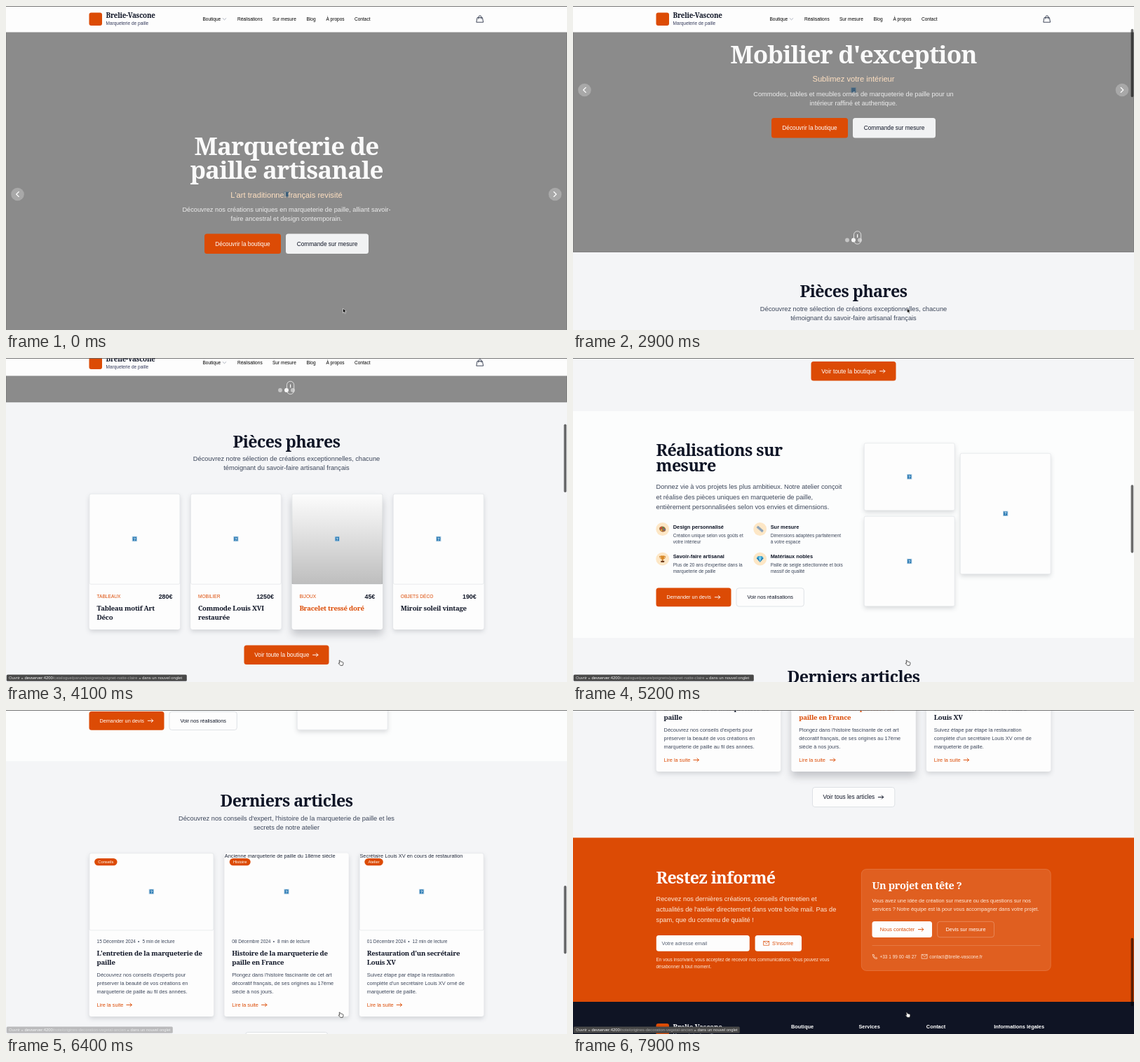
Recreate the animation shown at these times as an HTML page. Size 800x463 px, loop 8 s.

```html
<!DOCTYPE html>
<html lang="fr">
<head>
<meta charset="utf-8">
<title>Marqueterie de paille</title>
<style>
html, body { margin: 0; width: 100%; height: 100%; overflow: hidden; background: #f4f5f7; }
svg { display: block; width: 800px; height: 463px; }
text { font-family: "Liberation Sans", Arial, sans-serif; white-space: pre; }
.serif { font-family: "Noto Serif", Georgia, serif; font-weight: 700; letter-spacing: -.025em; }
.bold { font-weight: 700; }
.mid { text-anchor: middle; }
.end { text-anchor: end; }
.shadow { filter: drop-shadow(0 3px 3px rgba(20, 25, 40, .15)); }
</style>
</head>
<body>
<svg id="stage" viewBox="0 0 800 463" xmlns="http://www.w3.org/2000/svg"></svg>
<script>
const ORANGE = '#dc4b05', INK = '#0f1526', BODY = '#3c465a', WHITE = '#fdfdfd', GREY = '#f4f5f7';
const BRAND = 'Brelie-Vascone';

const text = (x, y, size, fill, str, cls = '', extra = '') =>
  `<text x="${x}" y="${y}" font-size="${size}" fill="${fill}" class="${cls}" ${extra}>${str}</text>`;
const lines = (x, y, step, size, fill, rows, cls, extra) =>
  rows.map((row, i) => text(x, y + i * step, size, fill, row, cls, extra)).join('');
const rect = (x, y, w, h, fill, r = 0, extra = '') =>
  `<rect x="${x}" y="${y}" width="${w}" height="${h}" rx="${r}" fill="${fill}" ${extra}/>`;
const path = (d, color, width = .9, extra = '') =>
  `<path d="${d}" fill="none" stroke="${color}" stroke-width="${width}" stroke-linecap="round" stroke-linejoin="round" ${extra}/>`;
const circle = (x, y, r, fill, extra = '') => `<circle cx="${x}" cy="${y}" r="${r}" fill="${fill}" ${extra}/>`;
const arrow = (x, y, color, extra) => path(`M${x} ${y}h7.4m-2.4-2.4l2.4 2.4l-2.4 2.4`, color, .95, extra);
const envelope = (x, y, color) =>
  path(`M${x} ${y - 2.8}h7.6v5.8h-7.6zl3.8 3.2l3.8-3.2`, color, .7);
const border = (color, width = .7) => `stroke="${color}" stroke-width="${width}"`;
const missing = (x, y, id = '') => `<g ${id}>` +
  rect(x - 3.7, y - 3.7, 7.4, 7.4, '#b9d3e6') + rect(x - 2.7, y - 2.9, 5.4, 5.8, '#2f7db5') +
  text(x, y + 2, 5.5, '#e4f1fa', '?', 'mid bold') + '</g>';
const frame = (x, y, w, h) => rect(x, y, w, h, WHITE, 3, 'class="shadow"') +
  rect(x + .3, y + .3, w - .6, h - .6, 'none', 2, border('#dcdfe3', .6));

function slide(id, title, titleY, sub, desc) {
  const y = titleY + (title.length - 1) * 34;
  const top = y + 78.5;
  return `<g id="${id}">` +
    lines(400, titleY, 34, 35, '#fafafa', title, 'serif mid') +
    text(400, y + 26.5, 11.15, '#fedfc0', sub, 'mid') +
    lines(400, y + 47, 13, 9.23, '#ececec', desc, 'mid') +
    rect(283, top, 109, 28.5, ORANGE, 3.5) + text(337.5, top + 17.3, 8.3, '#fff', 'Découvrir la boutique', 'mid') +
    rect(399, top, 118, 28.5, '#f1f2f3', 3.5) + text(458, top + 17.3, 8.3, INK, 'Commande sur mesure', 'mid') +
    '</g>';
}

function hero() {
  const nav = (x, dx) => circle(x, 269, 9.3, '#fff', 'fill-opacity=".25"') +
    path(`M${x - dx} 265.5l${2 * dx} 3.5l${-2 * dx} 3.5`, '#fff', 1.1);
  return rect(0, 37, 800, 464, '#8b8b8b') + rect(.5, 37.5, 799, 463, 'none', 0, border('#7c7c7c')) +
    `<g opacity=".65">${rect(396.3, 265.3, 7.4, 7.4, '#53748c')}${rect(397.3, 266.1, 5.4, 5.8, '#174a73')}</g>` +
    slide('slideA', ['Marqueterie de', 'paille artisanale'], 213, "L'art traditionnel français revisité",
      ['Découvrez nos créations uniques en marqueterie de paille, alliant savoir-', 'faire ancestral et design contemporain.']) +
    slide('slideB', ["Mobilier d'exception"], 230.5, 'Sublimez votre intérieur',
      ['Commodes, tables et meubles ornés de marqueterie de paille pour un', 'intérieur raffiné et authentique.']) +
    nav(16.5, -1.8) + nav(783, 1.8) +
    [391, 400, 409].map((x, i) => circle(x, 483.5, 2.9, '#fff', `opacity="${i === 1 ? 1 : .5}"`)).join('') +
    rect(400.5, 470.8, 10.2, 18.4, 'none', 5.1, border('#e8e8e8', .9)) + path('M405.6 475.5v4', '#fff', 1.2);
}

function products() {
  const items = [['TABLEAUX', '280€', ['Tableau motif Art', 'Déco']], ['MOBILIER', '1250€', ['Commode Louis XVI', 'restaurée']],
    ['BIJOUX', '45€', ['Bracelet tressé doré']], ['OBJETS DÉCO', '190€', ['Miroir soleil vintage']]];
  return rect(0, 501, 800, 418, GREY) +
    text(400, 565, 23.3, INK, 'Pièces phares', 'serif mid') +
    lines(400, 584.5, 13, 9.25, BODY, ['Découvrez notre sélection de créations exceptionnelles, chacune',
      'témoignant du savoir-faire artisanal français'], 'mid') +
    items.map(([kind, price, title], i) => {
      const x = 118.7 + i * 144.45, hot = i === 2;
      return rect(x, 631.5, 129.5, 194, WHITE, 3.5, `class="shadow" ${hot ? 'id="product"' : ''}`) +
        rect(x + .3, 631.8, 128.9, 128.9, 'none', 2, border('#dcdfe3', .6)) +
        (hot ? rect(x, 631.5, 129.5, 129, 'url(#shade)', 0, 'id="productShade"') : '') +
        missing(x + 64.7, 696) +
        text(x + 10.8, 780.5, 6.6, ORANGE, kind) + text(x + 118.7, 781.4, 8.9, INK, price, 'bold end') +
        lines(x + 10.8, 798.3, 13, 9.6, INK, title, 'serif', hot ? 'id="productTitle"' : '');
    }).join('') +
    rect(339.5, 848, 121, 27.5, ORANGE, 3.5) + text(354.3, 864.7, 8.3, '#fff', 'Voir toute la boutique') + arrow(437.5, 861.8, '#fff');
}

function feature(x, y, title, rows, glyph) {
  return circle(x, y, 9.4, '#fde7c6') + `<g transform="translate(${x} ${y})">${glyph}</g>` +
    text(x + 15, y - 1, 7.4, INK, title, 'bold') + lines(x + 15, y + 11.2, 9, 6.5, BODY, rows);
}

function custom() {
  const palette = '<ellipse rx="4.8" ry="3.8" fill="#a5683c" transform="rotate(25)"/>' +
    circle(-2, -1.5, 1.1, '#e23b3b') + circle(1, -1.8, 1.1, '#3a9b55') + circle(2.6, .8, 1.1, '#3b79c9') + circle(-1.5, 1.6, 1, '#f4c63d');
  const ruler = '<g transform="rotate(42)">' + rect(-5.5, -1.7, 11, 3.4, '#93a9bf', .5) + path('M-3.5-1.5v1.5m2.3-1.5v1.5m2.3-1.5v1.5m2.3-1.5v1.5', '#5f748a', .5) + '</g>';
  const trophy = path('M-4-3.7h8q0 3.7-3 3.7h-2q-3 0-3-3.7', '#c97a20', .8) + '<path d="M-2.7-4.8h5.4q0 5.5-2.7 5.8q-2.7-.3-2.7-5.8z" fill="#d98a27"/>' +
    rect(-.6, .8, 1.2, 2, '#b86d1b') + rect(-2.4, 2.6, 4.8, 2.2, '#6e3d1f', .4);
  const gem = '<path d="M-5-1.3l2-2.7h6l2 2.7l-5 5.8z" fill="#2f9fd0"/><path d="M-5-1.3h10l-5 5.8z" fill="#1c79b3"/><path d="M-2-1.3l2-2.7l2 2.7l-2 5.8z" fill="#7fd0ee"/>';
  return rect(0, 919, 800, 324, '#fcfdfd') +
    lines(118.5, 982.5, 22.5, 23.3, INK, ['Réalisations sur', 'mesure'], 'serif') +
    lines(118.5, 1029.7, 14.8, 9.25, BODY, ['Donnez vie à vos projets les plus ambitieux. Notre atelier conçoit',
      'et réalise des pièces uniques en marqueterie de paille,', 'entièrement personnalisées selon vos envies et dimensions.']) +
    feature(127.7, 1087.5, 'Design personnalisé', ['Création unique selon vos goûts et', 'votre intérieur'], palette) +
    feature(266.7, 1087.5, 'Sur mesure', ['Dimensions adaptées parfaitement', 'à votre espace'], ruler) +
    feature(127.7, 1130.2, 'Savoir-faire artisanal', ["Plus de 20 ans d'expertise dans la", 'marqueterie de paille'], trophy) +
    feature(266.7, 1130.2, 'Matériaux nobles', ['Paille de seigle sélectionnée et bois', 'massif de qualité'], gem) +
    rect(118.5, 1171.5, 107, 26.7, ORANGE, 3.5) + text(133.4, 1187.3, 7.32, '#fff', 'Demander un devis') + arrow(202.3, 1184.8, '#fff') +
    rect(233, 1171.8, 96.3, 26.2, WHITE, 3.5, border('#d3d7dd')) + text(281.2, 1187.3, 7.32, INK, 'Voir nos réalisations', 'mid') +
    frame(415, 964.5, 129.5, 96.5) + frame(415, 1069, 129.5, 129) + frame(552, 979, 129.5, 173) +
    missing(479.7, 1012.7) + missing(479.7, 1133.5) + missing(616.7, 1065.3);
}

function articles() {
  const items = [
    ['Conseils', 32.5, '15', '5', ["L'entretien de la marqueterie de", 'paille'], '',
      ["Découvrez nos conseils d'experts pour", 'préserver la beauté de vos créations en', 'marqueterie de paille au fil des années.']],
    ['Histoire', 30, '08', '8', ['Histoire de la marqueterie de', 'paille en France'], 'Ancienne marqueterie de paille du 18ème siècle',
      ["Plongez dans l'histoire fascinante de cet art", 'décoratif français, de ses origines au 17ème', 'siècle à nos jours.']],
    ['Atelier', 26.5, '01', '12', ["Restauration d'un secrétaire", 'Louis XV'], 'Secrétaire Louis XV en cours de restauration',
      ['Suivez étape par étape la restauration', "complète d'un secrétaire Louis XV orné de", 'marqueterie de paille.']]];
  return rect(0, 1243, 800, 459, GREY) +
    text(400, 1307, 23.3, INK, 'Derniers articles', 'serif mid') +
    lines(400, 1327, 13, 9.25, BODY, ["Découvrez nos conseils d'expert, l'histoire de la marqueterie de paille et les", 'secrets de notre atelier'], 'mid') +
    items.map(([tag, tagWidth, day, minutes, title, alt, rows], i) => {
      const x = 118.7 + i * 192.6, hot = i === 1, left = x + 10.9;
      return rect(x, 1374, 177.5, 233.5, WHITE, 3.5, `class="shadow" ${hot ? 'id="article"' : ''}`) +
        (hot ? '' : rect(x + .3, 1374.3, 176.9, 110, 'none', 2, border('#dcdfe3', .6))) +
        text(x + .5, 1380.6, 7.4, '#20283a', alt) +
        rect(x + 7.4, 1381.4, tagWidth, 10.4, ORANGE, 5.2) + text(x + 7.4 + tagWidth / 2, 1388.6, 5.75, '#fff', tag, 'mid') +
        missing(x + 88.7, 1429) +
        text(left, 1502.7, 6.5, BODY, `${day} Décembre 2024`) + text(left + 58.5, 1502.7, 6.5, BODY, '•') +
        text(left + 64.8, 1502.7, 6.5, BODY, `${minutes} min de lecture`) +
        lines(left, 1520, 13, 9.6, INK, title, 'serif', hot ? 'data-hot="article"' : '') +
        lines(left, 1550.3, 12, 7.4, BODY, rows) +
        text(left, 1593.5, 7.4, ORANGE, 'Lire la suite') + arrow(left + 42.3, 1590.9, ORANGE, hot ? 'id="articleArrow"' : '');
    }).join('') +
    rect(341.5, 1630, 117.3, 28, WHITE, 3.5, border('#d3d7dd')) + text(356.4, 1646.8, 8.3, INK, 'Voir tous les articles') + arrow(435.3, 1644, INK);
}

function contact() {
  const pale = '#fdeadb';
  return rect(0, 1702, 800, 234.5, ORANGE) +
    text(118.5, 1767, 23.3, '#fff', 'Restez informé', 'serif') +
    lines(118.5, 1792.4, 14.8, 9.25, pale, ["Recevez nos dernières créations, conseils d'entretien et",
      "actualités de l'atelier directement dans votre boîte mail. Pas de", 'spam, que du contenu de qualité !']) +
    rect(118.8, 1841.5, 133, 22.8, WHITE, 3.5) + text(126.4, 1855.3, 7.35, '#566072', 'Votre adresse email') +
    rect(259.6, 1841.5, 66.4, 22.8, WHITE, 3.5) + envelope(272, 1852.8, ORANGE) + text(284, 1855.3, 7.35, ORANGE, "S'inscrire") +
    lines(118.5, 1878.7, 9.4, 6.45, pale, ['En vous inscrivant, vous acceptez de recevoir nos communications. Vous pouvez vous', 'désabonner à tout moment.']) +
    rect(411.3, 1747, 270, 145, '#fff', 7, 'fill-opacity=".11" stroke="#fff" stroke-opacity=".22" stroke-width=".7"') +
    text(426.5, 1775.5, 14.5, '#fff', 'Un projet en tête ?', 'serif') +
    lines(426.5, 1794.7, 12, 7.4, pale, ['Vous avez une idée de création sur mesure ou des questions sur nos', 'services ? Notre équipe est là pour vous accompagner dans votre projet.']) +
    rect(426.5, 1821.5, 85.5, 23, WHITE, 3.5) + text(437.8, 1835.6, 7.35, ORANGE, 'Nous contacter') + arrow(492.4, 1833.1, ORANGE) +
    rect(519.7, 1821.8, 80.8, 22.4, 'none', 3.5, 'stroke="#fff" stroke-opacity=".35" stroke-width=".7"') + text(560.1, 1835.6, 7.35, '#fff', 'Devis sur mesure', 'mid') +
    rect(426.5, 1855.8, 240, .7, '#fff', 0, 'opacity=".22"') +
    path('M427.4 1869.3l1.5-.4l.9 1.8l-.9.8q.8 1.6 2.2 2.2l.8-.9l1.7.9l-.4 1.5q-5.3-.2-5.8-5.9z', pale, .7) +
    text(437.4, 1874, 6.5, pale, '+33 1 99 00 48 27') + envelope(497.5, 1871.7, pale) +
    text(508.2, 1874, 6.5, pale, 'contact@brelie-vascone.fr') +
    rect(0, 1936.5, 800, 231, '#0f1424') +
    rect(118.5, 1967.5, 18.5, 18.5, ORANGE, 3) + text(142.5, 1976, 9.9, '#fff', BRAND, 'serif') +
    text(142.5, 1986, 6.5, '#aab0bd', 'Marqueterie de paille') +
    ['Boutique', 'Services', 'Contact', 'Informations légales'].map((label, i) => text(311 + i * 96.4, 1974, 7.4, '#fff', label, 'bold')).join('');
}

function header() {
  const nav = [[280.4, 'Boutique'], [330, 'Réalisations'], [380, 'Sur mesure'], [428.5, 'Blog'], [456.4, 'À propos'], [497, 'Contact']];
  return rect(0, 0, 800, 37.5, WHITE) + rect(118.5, 9.5, 18.5, 18.5, ORANGE, 3) +
    text(142.5, 17.2, 9.9, INK, BRAND, 'serif') + text(142.5, 27.3, 6.5, '#353b5c', 'Marqueterie de paille') +
    nav.map(([x, label]) => text(x, 21, 6.55, '#000', label)).join('') +
    path('M309.2 17.6l2.3 2.2l2.3-2.2', '#8b93a3', .7) +
    path('M672.4 16.6h7l1.2 6.6h-9.4zM674 18.2v-2.5a1.9 1.9 0 0 1 3.8 0v2.5', '#2c3448', .9);
}

const status = (id, width, route) => `<g id="${id}">` + rect(.8, 452.5, width, 9.2, '#484848', 1.5) +
  `<text x="4" y="459.2" font-size="5.85" fill="#e4e4e4">Ouvrir « <tspan fill="#fff">devserver:4200</tspan><tspan fill="#a9a9a9">${route}</tspan> » dans un nouvel onglet</text></g>`;

document.getElementById('stage').innerHTML =
  '<defs><linearGradient id="shade" x2="0" y2="1"><stop stop-opacity="0"/><stop offset="1" stop-opacity=".25"/></linearGradient></defs>' +
  `<g id="page">${hero()}${products()}${custom()}${articles()}${contact()}</g><g id="header">${header()}</g>` +
  rect(0, 0, 800, .9, '#666') +
  rect(795.6, 0, 3.6, 97.5, '#000', 1.8, 'id="thumb" fill-opacity=".58"') +
  status('statusA', 257, '/catalogue/parure/poignets/poignet-natte-claire') +
  status('statusB', 237, '/note/origines-decoration-vegetal-ancien') +
  '<g id="pointer"><path d="M0 0v6.6l1.6-1.4l1.1 2.4l1.1-.5l-1.1-2.3h2.1z" fill="#000" stroke="#fff" stroke-width=".6"/></g>' +
  '<g id="hand"><path d="M-1.9-3.2q.9-.8 1.5.3l.7 1.5q1.1-.5 1.4.2q1-.3 1.2.5q.9-.1 1 .8q.2 2-.8 3.7h-3.3q-1.6-1.6-2.6-3q0-1.1 1.6-.1z" fill="#fff" stroke="#222" stroke-width=".75" stroke-linejoin="round"/></g>';

const $ = id => document.getElementById(id);
const clamp = v => Math.min(1, Math.max(0, v));
const ramp = (t, from, to) => clamp((t - from) / (to - from));
const ease = v => v * v * (3 - 2 * v);

// Scroll gestures: [ms, offset] joined by a monotone cubic.
const keys = [[2600, 0], [2700, 33], [2800, 86], [2900, 149], [3100, 250], [3300, 318], [3500, 356], [3700, 374], [3900, 386],
  [4100, 437.5], [4300, 555], [4500, 665], [4700, 745], [4950, 812], [5200, 843], [5400, 858], [5600, 930], [5800, 1030],
  [6000, 1105], [6200, 1152], [6400, 1169.5], [6500, 1176], [6700, 1245], [6900, 1332], [7200, 1426], [7500, 1482], [7900, 1519.5]];
const slope = i => i < 0 || i > keys.length - 2 ? 0 : (keys[i + 1][1] - keys[i][1]) / (keys[i + 1][0] - keys[i][0]);
const tangent = i => {
  const a = slope(i - 1), b = slope(i);
  return a * b > 0 ? 2 * a * b / (a + b) : 0;
};
function scrollAt(t) {
  if (t <= keys[0][0]) return 0;
  const i = keys.findIndex((k, n) => n === keys.length - 2 || t < keys[n + 1][0]);
  const [t0, y0] = keys[i], [t1, y1] = keys[i + 1], d = t1 - t0, u = clamp((t - t0) / d);
  return y0 + (y1 - y0) * ease(u) + d * u * (1 - u) * (tangent(i) * (1 - u) - tangent(i + 1) * u);
}

const mix = v => `rgb(${[[15, 220], [21, 75], [38, 5]].map(([a, b]) => Math.round(a + (b - a) * v)).join()})`;
const lift = (id, v) => {
  $(id).style.filter = `drop-shadow(0 ${3 + 4 * v}px ${3 + 3 * v}px rgba(20,25,40,${.15 + .08 * v}))`;
};

function render(t) {
  const scroll = scrollAt(t);
  $('page').setAttribute('transform', `translate(0 ${-scroll})`);
  $('header').setAttribute('transform', `translate(0 ${Math.min(0, 425.5 - scroll)})`);
  $('thumb').setAttribute('y', 1 + scroll * .2137);
  $('thumb').setAttribute('opacity', t >= 2600 ? 1 : 0);

  const fade = ease(ramp(t, 0, 600));
  $('slideA').setAttribute('opacity', 1 - fade);
  $('slideB').setAttribute('opacity', fade);

  const product = ease(ramp(t, 3600, 3900)) * (1 - ramp(t, 6000, 6200));
  lift('product', product);
  $('productShade').setAttribute('opacity', product);
  $('productTitle').setAttribute('fill', mix(product));
  $('statusA').setAttribute('opacity', ramp(t, 3600, 3900) * (1 - ramp(t, 5900, 6200)));

  const article = ease(ramp(t, 6400, 6700));
  lift('article', article);
  document.querySelectorAll('[data-hot]').forEach(el => el.setAttribute('fill', mix(article)));
  $('articleArrow').setAttribute('transform', `translate(${2 * article} 0)`);
  $('statusB').setAttribute('opacity', ramp(t, 6300, 6600));

  const overLink = t >= 3700;
  $('pointer').setAttribute('transform', `translate(${480.5 - 4 * ease(ramp(t, 300, 1600))} 432)`);
  $('pointer').setAttribute('opacity', overLink ? 0 : 1);
  $('hand').setAttribute('transform', 'translate(477 435.5)');
  $('hand').setAttribute('opacity', overLink ? 1 : 0);
}

const LOOP = 8000, STEP = 100, start = performance.now();
function tick() {
  const t = (performance.now() - start) % LOOP;
  render(Math.floor(t / STEP) * STEP);
  requestAnimationFrame(tick);
}
tick();
</script>
</body>
</html>
```
